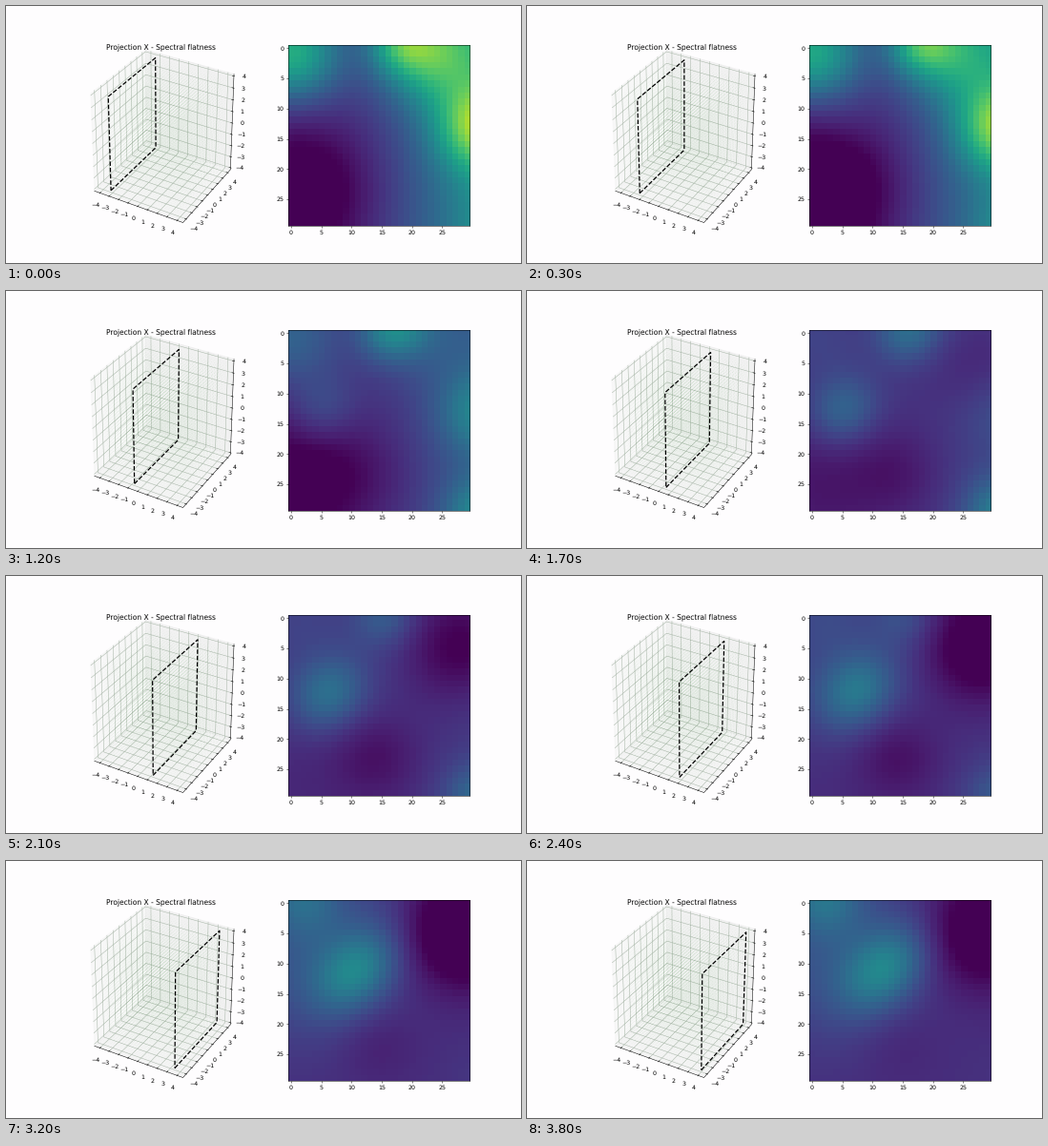
Recreate the animation shown at these times as a matplotlib script. Size 540 by 270 pixels, loop 3900 ms.

```python
import numpy as np
import matplotlib.pyplot as plt
from matplotlib.animation import FuncAnimation

plt.rcParams["text.hinting"] = "none"

W, H, DPI = 540, 270, 45
FRAMES, STEP_MS = 39, 100
N = 30                       # grid points per axis
EDGE = 0.5 + 1 / 48          # pane distance from the cube centre
LABEL_GAP = 0.086
SQUARE = np.array([(-1, -1), (1, -1), (1, 1), (-1, 1)])
ROW, COL = np.mgrid[:N, :N]


def bell(distance, width):
    return np.exp(-(distance / width) ** 2)


def bump(s, height, col, row, centre, size):
    """Round bump in the slice plane that swells and fades along the volume."""
    return height * bell(COL - col, size) * bell(ROW - row, size) * bell(s - centre, 8)


def drifting_spot(s):
    """Bright spot that wanders up and right while stretching diagonally."""
    t = np.clip((s - 17) / 12, 0, 1)
    dc, dr = COL - (5 + 7 * t), ROW - (13 - 2 * t)
    along, across = (dc - dr) / 2 ** 0.5, (dc + dr) / 2 ** 0.5
    height = (0.19 + 0.06 * t) * bell(min(s - 17, 0), 8)
    return height * bell(along, 6 + 2 * t) * bell(across, 5.5)


def field(s):
    """Scalar field on slice s of the volume."""
    total = 0.13 + 0.34 * (COL / (N - 1)) ** 2 * bell(s, 12) + drifting_spot(s)
    total += bump(s, 0.46, 31, 13, 5, 7)       # right edge
    total += bump(s, 0.40, 23, 1, 2, 8)        # top right
    total += bump(s, 0.30, 18, -1, 6, 5)       # top edge
    total += bump(s, 0.50, 0, 1, 4, 8)         # top left
    total += bump(s, -0.28, 2, 24, 7, 12)      # dark lower left
    total += bump(s, 0.16, 15, 0, 15, 5)
    total += bump(s, 0.25, 31, 30, 15, 6)
    total += bump(s, -0.10, 14, 23, 21, 7)
    total += bump(s, -0.30, 28, 5, 25, 9)      # dark top right
    total += bump(s, 0.14, 4, 9, 27, 14)
    total += bump(s, 0.20, 2, -1, 31, 6)
    return np.clip(total, 0, 1)


def project(x, y, z):
    """Perspective view (elevation 30, azimuth -60) of the unit cube, in pixels."""
    az, el = np.radians(-60), np.radians(30)
    right = -np.sin(az) * x + np.cos(az) * y
    ground = np.cos(az) * x + np.sin(az) * y
    up = np.cos(el) * z - np.sin(el) * ground
    depth = 10 - np.cos(el) * ground - np.sin(el) * z
    return 165.2 + 1028 * right / depth, 133.5 - 1124 * up / depth


def unit(x, y, z):
    """Data coordinates to cube coordinates; x and y carry a 5% margin."""
    return x / 8.8, y / 8.8, z / 8


def path(*points):
    return project(*np.array(points, float).T)


fig = plt.figure(figsize=(W / DPI, H / DPI), dpi=DPI, facecolor="#fefdfe")
view = fig.add_axes([0, 0, 1, 1])
view.set(xlim=(0, W), ylim=(H, 0))
view.axis("off")


def stroke(*points, **style):
    view.plot(*path(*points), **style)


def label(value, point, dy=0):
    px, py = project(*point)
    view.text(px, py + dy, str(value).replace("-", "\u2212"), fontsize=10,
              ha="center", va="center")


def draw_cube():
    e = EDGE
    for axis, side, grey in ((0, -e, 0.95), (1, e, 0.90), (2, -e, 0.925)):
        corners = np.insert(SQUARE * e, axis, side, axis=1)
        view.fill(*path(*corners), color=str(grey), alpha=0.5, lw=1)

    grid = dict(color="#a6b4a6", lw=0.8)
    edge = dict(color="black", lw=0.8)
    tick_out, tick_in = e + 0.1 / 12, e - 0.2 / 12
    far = e + LABEL_GAP
    for v in range(-4, 5):
        a, _, c = unit(v, v, v)
        stroke((a, -e, -e), (a, e, -e), (a, e, e), **grid)
        stroke((e, a, -e), (-e, a, -e), (-e, a, e), **grid)
        stroke((-e, -e, c), (-e, e, c), (e, e, c), **grid)
        stroke((a, -tick_out, -e), (a, -tick_in, -e), **edge)
        stroke((tick_out, a, -e), (tick_in, a, -e), **edge)
        stroke((tick_out, e, c), (tick_in, e, c), **edge)
        label(v, (a, -far, -far))
        label(v, (far, a, -far))
        label(v, (far - 0.012, far - 0.012, c), dy=2)
    stroke((-e, -e, -e), (e, -e, -e), (e, e, -e), (e, e, e), **edge)


def draw_points():
    side = np.linspace(-4, 4, N)
    x, y, z = (g.ravel() for g in np.meshgrid(side, side, side))
    view.scatter(*project(*unit(x, y, z)), s=1, color="green", alpha=0.03,
                 linewidths=0, zorder=2.5)


draw_cube()
draw_points()
view.text(162.6, 45.3, "Projection X - Spectral flatness", fontsize=12,
          ha="center", va="baseline", zorder=4)
plane, = view.plot([], [], "--", color="black", lw=2, zorder=5)

heat_ax = fig.add_subplot(1, 2, 2)
heat = heat_ax.imshow(field(0), cmap="viridis", vmin=0, vmax=1,
                      interpolation="nearest")


def update(frame):
    index = min(N - 1, int(3.97 + 0.735 * frame))
    x = -4 + 8 * index / (N - 1)
    outline = 4 * np.vstack([SQUARE, SQUARE[:1]])
    plane.set_data(*path(*[unit(x, y, z) for y, z in outline]))
    heat.set_data(field(index))
    return plane, heat


anim = FuncAnimation(fig, update, frames=FRAMES, interval=STEP_MS,
                     repeat=True, repeat_delay=0)
plt.show()
```
